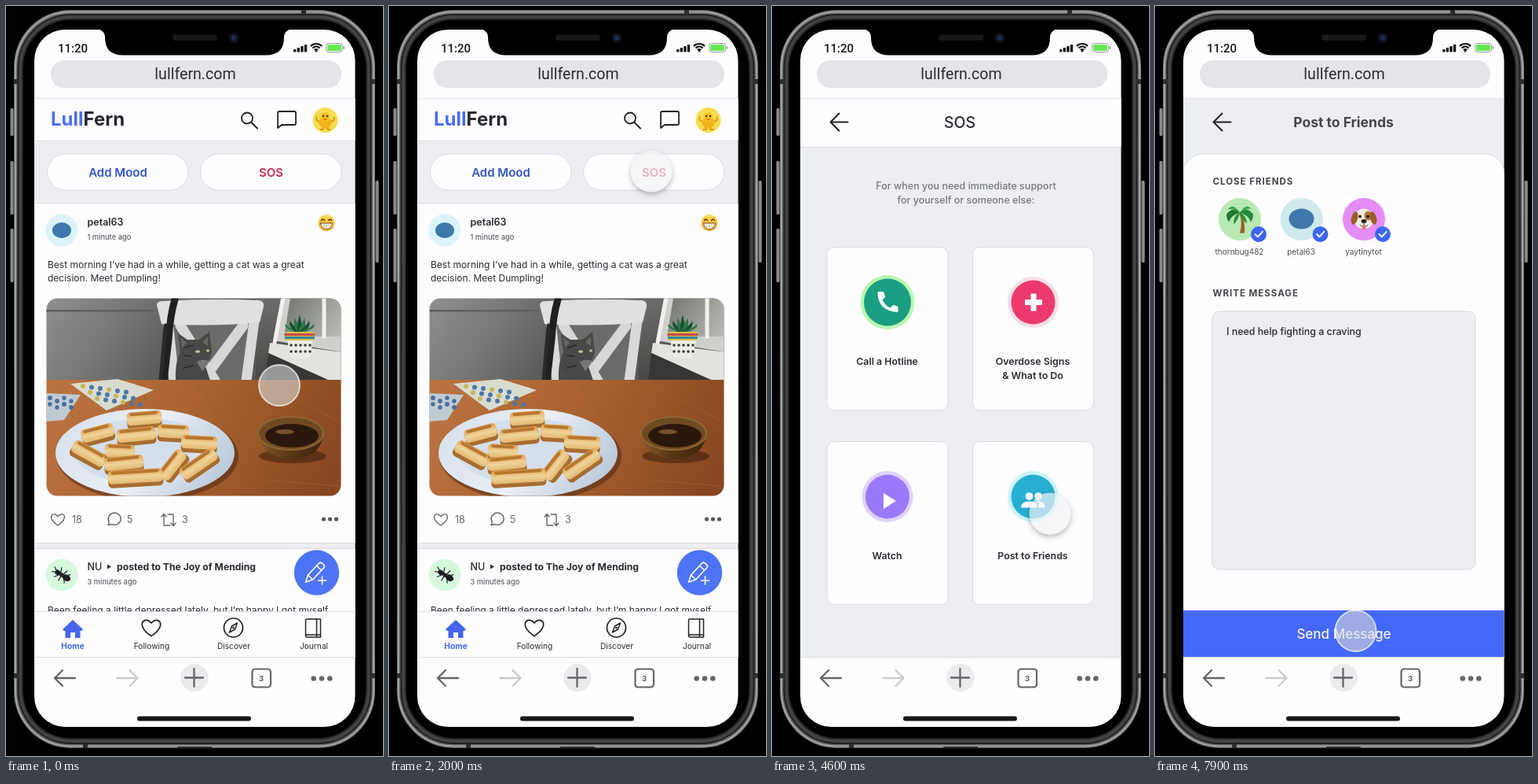
These frames come from a looping animation (480x953 px, 8 s). An HTML page with a canvas:

```html
<!DOCTYPE html>
<html lang="en">
<head>
<meta charset="utf-8">
<title>LullFern</title>
<style>
html, body { margin: 0; width: 100%; height: 100%; overflow: hidden; background: #000; }
canvas { display: block; width: 480px; height: 953px; }
</style>
</head>
<body>
<canvas id="stage"></canvas>
<script>
const W = 480, H = 953, LOOP = 8000, PAGE_W = 410;
const canvas = document.getElementById('stage');
const dpr = window.devicePixelRatio || 1;
canvas.width = W * dpr;
canvas.height = H * dpr;
const c = canvas.getContext('2d');

const INK = '#2b2b31', GREY = '#66666b', BLUE = '#4468f8', PALE = '#eceef2', WHITE = '#fefdff', RULE = '#dcdde2';
const TAU = Math.PI * 2;

// ---- helpers ----
const clamp = v => Math.max(0, Math.min(1, v));
const ramp = (t, a, b) => clamp((t - a) / (b - a));
const ease = p => p * p * (3 - 2 * p);

function paint(fill, stroke, lw = 1) {
  if (fill) { c.fillStyle = fill; c.fill(); }
  if (stroke) { c.strokeStyle = stroke; c.lineWidth = lw; c.stroke(); }
}
function box(x, y, w, h, r, fill, stroke, lw) {
  c.beginPath();
  c.roundRect(x, y, w, h, r);
  paint(fill, stroke, lw);
}
function oval(x, y, rx, ry, fill, stroke, lw, rot = 0) {
  c.beginPath();
  c.ellipse(x, y, rx, ry, rot, 0, TAU);
  paint(fill, stroke, lw);
}
const dot = (x, y, r, fill, stroke, lw) => oval(x, y, r, r, fill, stroke, lw);
function shape(d, x, y, fill, stroke, lw = 1.6, scale = 1) {
  c.save();
  c.translate(x, y);
  c.scale(scale, scale);
  const p = new Path2D(d);
  if (fill) { c.fillStyle = fill; c.fill(p); }
  if (stroke) {
    c.strokeStyle = stroke; c.lineWidth = lw;
    c.lineCap = c.lineJoin = 'round';
    c.stroke(p);
  }
  c.restore();
}
function text(s, x, y, size, weight, color, align = 'left', family = 'Inter') {
  c.font = `${weight} ${size}px ${family}, sans-serif`;
  c.fillStyle = color;
  c.textAlign = align;
  c.fillText(s, x, y);
}
function caps(s, x, y) {
  c.letterSpacing = '1px';
  text(s, x, y, 11.5, 700, '#46464b');
  c.letterSpacing = '0px';
}
function fade(alpha, draw) {
  if (alpha <= 0) return;
  c.save();
  c.globalAlpha = alpha;
  draw();
  c.restore();
}
function grad(x0, y0, x1, y1, ...stops) {
  const g = c.createLinearGradient(x0, y0, x1, y1);
  stops.forEach((s, i) => g.addColorStop(i / (stops.length - 1), s));
  return g;
}
const rule = (y, color = RULE) => box(36, y, 409, 1, 0, color);
function dots(x, y, gap, r, color) {
  for (let i = -1; i <= 1; i++) dot(x + i * gap, y, r, color);
}
const backArrow = () => shape('M11,0H-11M0,-11L-11,0L0,11', 85.5, 147.5, null, '#222', 2);

// ---- little pictures ----
function grin(x, y) {
  dot(x, y, 10.5, grad(x, y - 10, x, y + 10, '#ffdc55', '#f3a51f'));
  shape('M-6.5,-3Q-4.5,-6 -2.5,-3M2.5,-3Q4.5,-6 6.5,-3', x, y, null, '#5b3510', 1.4);
  shape('M-7.5,0.5H7.5Q6.5,8 0,8Q-6.5,8 -7.5,0.5Z', x, y, '#fff', '#7a4a1c', 1);
  shape('M-7,4.2H7M-3,1V7.5M0,1V8M3,1V7.5', x, y, null, '#b9a99a', 0.6);
}
function chick(x, y) {
  dot(x, y, 16, '#f8dc50');
  shape('M-7,2Q-13,1 -11,-4M7,2Q13,1 11,-4M-3,8V12H-6M3,8V12H6', x, y, null, '#df9411', 2);
  oval(x, y + 3, 8, 7.5, '#f1b31c');
  dot(x, y - 4, 6, '#f7c42c');
  dot(x - 2.5, y - 5, 1.3, '#4a3210');
  dot(x + 2.5, y - 5, 1.3, '#4a3210');
  shape('M-3,-2H3L0,1Z', x, y, '#e6721b');
}
function ant(x, y) {
  dot(x, y, 20.5, '#d6f8dd');
  c.save();
  c.translate(x, y);
  c.rotate(0.55);
  shape('M-2,0L-7,7M0,0L0,8M3,0L8,7M-2,0L-5,-8M1,0L3,-8M3,0L9,-6M-8,-1L-13,-4M-8,0L-13,3', 0, 0, null, '#222', 1.2);
  oval(7, 0, 5.5, 4, '#1d1d1f');
  oval(0, 0, 3.2, 2.6, '#2c2522');
  oval(-6, 0, 3.6, 3.2, '#1d1d1f');
  c.restore();
}
function palm(x, y) {
  shape('M-1,-8Q4,4 0,18H6Q7,4 2,-9Z', x, y, '#96622f');
  const leaf = 'M0,-8Q8,-17 17,-6Q17,0 14,4Q11,-5 0,-8Z';
  shape(leaf, x, y, '#23883a');
  c.save();
  c.translate(x, y);
  c.scale(-1, 1);
  shape(leaf, 0, 0, '#1c7a33');
  c.restore();
  shape('M0,-8Q-9,-21 -15,-12Q-7,-14 0,-8Q9,-21 14,-13Q6,-13 0,-8Z', x, y, '#37a548');
  shape('M0,-8Q-9,-4 -8,7Q-2,2 0,-8Q9,-4 9,6Q3,2 0,-8Z', x, y, '#2b9340');
}
function puppy(x, y) {
  oval(x, y, 12.5, 13, '#f4ece0');
  oval(x + 5.5, y - 4, 5, 6, '#b9763c');
  oval(x - 12, y - 1, 4, 8.5, '#9b5d2c', null, 0, 0.25);
  oval(x + 12, y - 1, 4, 8.5, '#9b5d2c', null, 0, -0.25);
  dot(x - 5, y - 3, 2, '#2a1b14');
  dot(x + 5, y - 3, 2, '#2a1b14');
  shape('M0,4V8M-5,8Q-2,11 0,8Q2,11 5,8', x, y, null, '#5b3a28', 1);
  oval(x, y + 3, 3.4, 2.4, '#241a18');
  oval(x, y + 11, 2.3, 3, '#ee6b7d');
}

// ---- post photograph, in flat tones ----
function photo() {
  c.save();
  c.beginPath();
  c.roundRect(51.5, 371.5, 375, 251, 14);
  c.clip();
  box(51, 371, 377, 105, 0, grad(52, 372, 200, 476, '#8f8f8d', '#777775', '#575755'));
  box(51, 386, 140, 2.5, 0, '#5f605e');
  box(318, 371, 34, 105, 0, grad(318, 372, 345, 474, '#6f6f6d', '#454644'));

  // window, sill
  shape('M350,371H428V440L340,425Z', 0, 0, '#cfd0cd');
  shape('M362,371H428V420H354Z', 0, 0, grad(355, 372, 425, 420, '#73766f', '#b9bcb6'));
  shape('M353,371L342,428M405,371V420', 0, 0, null, '#f0f0ee', 5);
  shape('M336,428L428,440V476H412L334,441Z', 0, 0, '#e2e2df');
  shape('M334,441L412,476H330Z', 0, 0, '#373735');

  // chair
  shape('M214,404H308V476H214Z', 0, 0, '#6b6c6a');
  shape('M222,406L266,476M302,406L250,476', 0, 0, null, '#d7d8d6', 13);
  shape('M206,400L214,476M316,400L306,476', 0, 0, null, '#d9dad8', 13);
  shape('M192,380Q192,375 200,375Q262,371 322,374Q329,375 328,382L323,402Q262,408 198,404Z', 0, 0, '#e0e1df');
  shape('M215,373Q209,393 207,424L201,476', 0, 0, null, '#211f20', 9);
  shape('M203,406L197,476', 0, 0, null, '#2a2829', 5);

  // cat
  shape('M216,476Q215,452 222,440L219,416L231,424H246L259,414L262,438Q262,449 253,455L260,476Z', 0, 0, '#474848');
  shape('M222,421L230,428L224,434ZM257,420L250,427L257,432Z', 0, 0, '#6c6562');
  shape('M243,452Q252,447 259,452L250,464Z', 0, 0, '#777775');
  oval(244, 439, 3, 1.8, '#b9bd91');
  oval(257, 438, 2, 1.8, '#b9bd91');
  shape('M228,434L238,431M227,444L236,445M226,460L238,457', 0, 0, null, '#292a2a', 1.5);

  // plant and pot
  for (let i = -3; i <= 3; i++) {
    const tip = i * 6, top = -23 + Math.abs(i) * 4;
    shape(`M-3,0Q${tip - 4},${top / 2} ${tip},${top}Q${tip + 3},${top / 2} 4,0Z`, 374, 415, i % 2 ? '#2d7748' : '#194f32');
  }
  shape('M358,424H391L387,446Q375,450 362,446Z', 0, 0, '#edece4');
  box(355, 414, 38, 11, 3, '#d6c14d');
  box(355, 416, 38, 3, 0, '#c94c45');
  box(355, 420, 38, 3, 0, '#37899a');
  for (let i = 0; i < 10; i++) dot(363 + (i % 5) * 6, 431 + Math.floor(i / 5) * 8, 1.8, '#3a3b3c');

  // table
  box(51, 475, 377, 149, 0, grad(80, 475, 410, 622, '#b9713f', '#a7602f', '#864620'));
  shape('M240,476L300,560M330,478L424,528M300,600L424,610', 0, 0, null, '#9d5a2d', 1);

  // napkins
  shape('M51,492L95,494L74,526L51,528Z', 0, 0, '#bfcbd3');
  shape('M82,480L142,474L188,488L128,514Z', 0, 0, '#d8dcd0');
  for (let i = 0; i < 18; i++) {
    const u = i % 6, v = Math.floor(i / 6);
    dot(98 + u * 11 + v * 9, 483 + u * 1.5 + v * 8, 3, i % 3 ? '#4f75a8' : '#c8b45d');
    if (i < 12) dot(56 + (i % 4) * 9, 498 + v * 8 + (i % 2) * 4, 2.7, '#496d9c');
  }

  // plate and food
  oval(180, 572, 116, 57, 'rgba(63,29,12,.45)');
  oval(177, 568, 114, 56, grad(90, 520, 260, 622, '#d9e3ee', '#e9eff5', '#bccbdc'));
  oval(177, 566, 90, 42, '#d3dfeb');
  const food = [[176, 525, 44, -.08], [117, 544, 42, -.25], [166, 546, 50, -.1], [105, 570, 46, .5],
    [145, 567, 38, .05], [150, 582, 50, -.1], [213, 542, 40, .05], [246, 556, 46, .05],
    [213, 584, 42, -.9], [246, 583, 52, -.6], [165, 599, 70, -.06]];
  for (const [x, y, w, a] of food) {
    c.save();
    c.translate(x, y);
    c.rotate(a);
    box(-w / 2, -8, w, 20, 5, '#a76c31');
    box(-w / 2, -10, w, 17, 5, grad(0, -10, 0, 8, '#d99c4b', '#f0d49a', '#e0b46c'));
    box(-w / 2 + 4, -9, w - 9, 4, 2, '#b87731');
    c.restore();
  }

  // bowl
  oval(365, 572, 43, 9, 'rgba(50,22,8,.5)');
  shape('M321,543Q323,565 344,572Q362,581 383,572Q402,565 404,543Z', 0, 0, grad(320, 545, 404, 575, '#8b602d', '#5b3817', '#39200e'));
  oval(362.5, 543, 41.5, 21, '#6f4a21', '#8e6736', 2);
  oval(364, 546, 34, 15, '#2c170d');
  oval(355, 541, 12, 3, '#76512f');
  c.restore();
}

// ---- pages ----
function pill(x, label, color) {
  box(x, 188, 179.5, 46, 23, WHITE, '#d9dbe1');
  text(label, x + 90, 217, 15, 600, color, 'center');
}
function home() {
  box(36, 118, 409, 709, 0, PALE);
  box(36, 118, 409, 53, 0, WHITE);
  rule(171);
  text('Lull', 57, 152, 24, 700, '#4b6cf3');
  const w = c.measureText('Lull').width;
  text('Fern', 57 + w, 152, 24, 700, '#27272e');
  dot(307, 142.5, 7, null, '#222', 1.8);
  shape('M312.5,148L320,155.5', 0, 0, null, '#222', 2);
  shape('M348,134H367Q369,134 369,136V149Q369,151 367,151H351L346,155V136Q346,134 348,134Z', 0, 0, null, '#222', 1.8);
  chick(406.5, 145);
  pill(52.5, 'Add Mood', '#3556c9');
  pill(247.5, 'SOS', '#c92f4b');

  box(36, 251, 409, 431, 0, WHITE);
  rule(250);
  rule(682);
  dot(71, 285, 20.5, '#dcf3fc');
  oval(71, 285, 12, 10, '#3f78ab');
  text('petal63', 103.5, 278.5, 12.5, 600, INK);
  text('1 minute ago', 103.5, 296.5, 9.3, 500, '#5f5f65');
  grin(408, 275.5);
  text('Best morning I’ve had in a while, getting a cat was a great', 53, 332.5, 12, 400, INK);
  text('decision. Meet Dumpling!', 53, 350, 12, 400, INK);
  photo();
  shape('M0,7.5C-15,-2 -7,-12 0,-4C7,-12 15,-2 0,7.5Z', 66, 652.5, null, GREY, 1.4);
  shape('M-8,7L-6.7,3A8,7.5 0 1 1 -3,6Z', 138, 652.5, null, GREY, 1.4);
  shape('M-9,-4L-6,-7.5L-3,-4M-6,-7V7H2M-1,-7H6V7M3,4L6,7.5L9,4', 207, 653, null, GREY, 1.4);
  text('18', 84, 657, 12.5, 400, GREY);
  text('5', 154, 657, 12.5, 400, GREY);
  text('3', 224, 657, 12.5, 400, GREY);
  dots(412.5, 652, 8, 2.6, '#58585d');

  box(36, 690, 409, 81, 0, WHITE);
  rule(689);
  ant(71, 723);
  text('NU', 103.5, 717, 12.5, 500, INK);
  shape('M129,709.5L134,712.5L129,715.5Z', 0, 0, INK);
  text('posted to The Joy of Mending', 141, 716.5, 12.2, 700, INK);
  text('3 minutes ago', 103.5, 735, 9.3, 500, '#5f5f65');
  text('Been feeling a little depressed lately, but I’m happy I got myself', 53, 772, 12, 400, INK);
  dot(395.5, 720, 28.7, '#4d74f5');
  shape('M-13,12L-10,3L4,-12Q6,-14 9,-11L10,-10Q12,-8 10,-6L-4,9ZM1,-9L7,-3M-10,3L-4,9M8,5V15M3,10H13', 394.5, 720, null, '#fff', 1.6);

  box(36, 770, 409, 57, 0, WHITE);
  rule(769);
  shape('M-13,1L0,-11L13,1L11,3H9.5V12H3V5H-3V12H-9.5V3H-11Z', 85, 791, '#4565ef');
  shape('M0,10.5C-21,-3 -9,-16 0,-6C9,-16 21,-3 0,10.5Z', 185, 790, null, '#222', 1.7);
  dot(289.5, 790, 12, null, '#222', 1.7);
  shape('M5,-6L2,2L-5,6L-2,-2Z', 289.5, 790, null, '#222', 1.5);
  dot(289.5, 790, 1.3, '#222');
  shape('M-9,-11H8Q9,-11 9,-10V8Q9,9 8,9H-8Q-10,9 -10,11Q-10,12 -8,12H4V-11M-10,11V-9Q-10,-11 -9,-11M4,12H9V-11', 391.5, 790, null, '#222', 1.5);
  text('Home', 85, 816.5, 10.3, 700, '#4565ef', 'center');
  ['Following', 'Discover', 'Journal'].forEach((s, i) =>
    text(s, [185.5, 290, 392][i], 816.5, 10.2, 400, INK, 'center'));
  box(444.5, 118, 1, 709, 0, RULE);
}

function card(x, y, color, ring, r, lines) {
  box(x + .5, y + .5, 154, 207, 9, WHITE, '#d9dce1');
  dot(x + 77.5, y + 70.5, r + 4.5, ring);
  dot(x + 77.5, y + 70.5, r, color);
  lines.forEach((s, i) => text(s, x + 77, y + 150 + i * 17.5, 12.4, 600, INK, 'center'));
}
function sos() {
  box(36, 118, 411, 709, 0, PALE);
  box(36, 118, 411, 61, 0, WHITE);
  rule(179);
  backArrow();
  text('SOS', 239, 154.5, 19.5, 500, INK, 'center');
  text('For when you need immediate support', 247, 233, 12.5, 500, '#77787e', 'center');
  text('for yourself or someone else:', 247, 250.5, 12.5, 500, '#77787e', 'center');
  card(69.5, 306, '#1a9e82', '#bbf6b0', 30, ['Call a Hotline']);
  card(255, 306, '#ed3a6d', '#f6dfe8', 28, ['Overdose Signs', '& What to Do']);
  card(69.5, 553, '#9b79fb', '#dfd3fb', 28, ['Watch']);
  card(255, 553, '#29aed3', '#cbf5fa', 28, ['Post to Friends']);
  shape('M-12,-13H-6Q-5,-13 -5,-12L-3.5,-7Q-3.5,-6 -4,-5.5L-7,-2.5Q-3,5 3,7.5L6,4.5Q6.5,4 7.5,4L12,5.5Q13,6 13,7V12Q13,13 12,13Q-13,11 -13,-12Q-13,-13 -12,-13Z', 147.5, 376, '#fff');
  shape('M-3.5,-11H3.5V-3.5H11V3.5H3.5V11H-3.5V3.5H-11V-3.5H-3.5Z', 333, 376.5, '#fff');
  shape('M-6,-10L10,0L-6,10Z', 148, 629, '#fff');
  dot(327.5, 623, 4.8, '#fff');
  dot(339, 623, 4.8, '#fff');
  shape('M-15,8V5Q-13,0 -5,0Q3,0 5,5V8ZM7,8V5Q7,2 4,0Q13,-1 15,5V8Z', 332.5, 629.5, '#fff');
}

function friend(x, color, name, draw) {
  dot(x, 271, 27, color);
  draw(x, 270.5);
  dot(x + 24, 290, 10, '#3d66f5');
  shape('M-4.5,0L-1.2,3.3L4.7,-3.2', x + 24, 290, null, '#fff', 2);
  text(name, x - .5, 316, 10, 400, '#4c4c52', 'center');
}
function compose(t) {
  const sent = ramp(t, 6400, 6600);
  box(36, 118, 411, 709, 0, PALE);
  backArrow();
  text('Post to Friends', 240, 154, 17.5, 700, '#45454a', 'center');
  box(36, 188, 409, 640, [25, 25, 0, 0], WHITE, '#d5d9dd');
  caps('CLOSE FRIENDS', 73.5, 227);
  friend(108, '#b8e9b3', 'thornbug482', palm);
  friend(186.5, '#cfe9ec', 'petal63', (x, y) => oval(x, y, 16, 13, '#3f78ab'));
  friend(266, '#e48cf5', 'yaytinytot', puppy);
  caps('WRITE MESSAGE', 73.5, 368.5);
  box(73, 388, 335, 328, 9, PALE, '#d5d8dd');
  fade(1 - sent, () => {
    text('Write here...', 91, 417, 12.5, 400, '#a9abb1');
    box(92, 673.5, 205, 28, 14, WHITE, '#d9dce3');
    text('I need help fighting a craving', 194, 692, 12.4, 500, '#3a55b4', 'center');
  });
  fade(sent, () => text('I need help fighting a craving', 91, 417.5, 12.4, 500, INK));
  box(36, 768, 411, 59, 0, '#7d7b82');
  fade(sent, () => box(36, 768, 411, 59, 0, BLUE));
  text('Send Message', 240.5, 804, 17, 500, '#f7f7fb', 'center');
}

// ---- phone ----
function body() {
  c.fillStyle = '#000';
  c.fillRect(0, 0, W, H);
  for (const [x, y, h] of [[5, 130, 35], [5, 197, 68], [5, 283, 68], [470, 222, 104]])
    box(x, y, 5, h, 2, grad(x, 0, x + 5, 0, '#3a3a3b', '#a19e9c', '#4a4a4a'));
  box(10, 5, 460, 938, 72, grad(0, 5, 0, 943, '#6d6b6b', '#555454', '#666464'));
  box(12, 7.5, 456, 933, 70, null, '#a5a2a0', 2.2);
  box(14.5, 10, 451, 928, 68, '#1f1f20');
  box(18.5, 14, 443, 920, 64, null, '#434344', 4);
  box(21, 17, 438, 914, 62, '#000', '#28282a', 1.5);
  for (const y of [93, 848]) {
    box(10, y, 6, 6, 0, '#2c2c2d');
    box(464, y, 6, 6, 0, '#2c2c2d');
  }
  box(376, 5, 6, 6, 0, '#2c2c2d');
  box(98, 937, 6, 6, 0, '#2c2c2d');
  box(218, 941, 44, 2.5, 1, '#29292a');
}
function statusBar() {
  box(36, 30, 409, 88, 0, WHITE);
  rule(117, '#e4e4e8');
  text('11:20', 66, 58.5, 15, 500, '#161618', 'left', 'Roboto');
  for (let i = 0; i < 4; i++) box(366 + i * 4.6, 55 - i * 2, 3.4, 3.5 + i * 2, .8, '#161618');
  for (const r of [3, 6.5, 10]) {
    c.beginPath();
    c.arc(395, 58, r, -Math.PI * .75, -Math.PI * .25);
    paint(null, '#161618', 2.2);
  }
  dot(395, 57, 1.5, '#161618');
  box(407.5, 47.5, 21, 11, 3, null, '#9a9a9d');
  box(409, 49, 18, 8, 1.5, '#66e854');
  box(429.5, 51, 1.5, 4, 1, '#9a9a9d');
  box(57, 69, 370, 35, 17, '#e4e5e9');
  text('lullfern.com', 241, 92.5, 19.6, 400, '#2d2d31', 'center', 'Roboto');
}
function browserBar() {
  box(36, 827, 409, 90, 0, WHITE);
  rule(827);
  shape('M13,0H-13M-3,-10L-13,0L-3,10', 75, 854, null, '#66666a', 2.3);
  shape('M-13,0H13M3,-10L13,0L3,10', 154.5, 854, null, '#cbcbcf', 2.3);
  dot(240, 853.5, 17.7, '#ebebee');
  shape('M-11.5,0H11.5M0,-11.5V11.5', 239.5, 853.5, null, '#66666a', 2.3);
  box(313.5, 842.5, 23.5, 23, 3.5, null, '#66666a', 2.2);
  text('3', 325, 857.5, 9.5, 700, '#5c5c60', 'center');
  dots(402, 854.5, 10.3, 3.3, '#66666a');
  box(167, 902.5, 145, 6, 3, '#18181b');
}
function notch() {
  shape('M116,29Q126,31 126,40Q126,62.5 149,62.5H331Q354,62.5 354,40Q354,31 364,29Z', 0, 0, '#000');
  box(212, 36.5, 57, 7.5, 3.7, '#18181a');
  dot(290, 40.5, 6.5, '#10121c');
  dot(290, 40.5, 3, '#1c2c5e');
}

// ---- touch marker ----
const moves = [
  [1200, 1800, 348, 482, 334, 210],
  [3500, 4250, 334, 210, 354, 645],
  [5300, 5950, 354, 645, 217.5, 685],
  [6750, 7500, 217.5, 685, 255.5, 794]
];
const presses = [[1780, 2900], [4350, 5050], [6000, 6450]];

function touch(t) {
  let [, , x, y] = moves[0];
  for (const [a, b, x0, y0, x1, y1] of moves) {
    if (t < a) break;
    const p = ease(ramp(t, a, b));
    x = x0 + (x1 - x0) * p;
    y = y0 + (y1 - y0) * p;
  }
  let down = 0;
  for (const [a, b] of presses) down = Math.max(down, ramp(t, a, a + 150) - ramp(t, b, b + 200));
  fade(down, () => {
    c.save();
    c.beginPath();
    c.rect(0, 0, W, H);
    c.arc(x, y, 26.5, 0, TAU);
    c.clip('evenodd');
    c.shadowColor = 'rgba(0,0,0,.3)';
    c.shadowBlur = 7 * dpr;
    c.shadowOffsetY = 3 * dpr;
    dot(x, y, 26, '#fff');
    c.restore();
    dot(x, y, 26.5, 'rgba(244,244,245,.68)');
  });
  fade(1 - down, () => dot(x, y, 26, 'rgba(215,217,217,.6)', 'rgba(250,250,250,.75)', 1.8));
}

function shifted(dx, draw) {
  if (Math.abs(dx) >= PAGE_W) return;
  c.save();
  c.translate(dx, 0);
  draw();
  c.restore();
}

function render(t) {
  c.setTransform(dpr, 0, 0, dpr, 0, 0);
  body();
  c.save();
  c.beginPath();
  c.roundRect(36, 30, 408.5, 886, 39);
  c.clip();
  const page = ease(ramp(t, 2150, 2650)) + ease(ramp(t, 4800, 5300));
  shifted(-page * PAGE_W, home);
  shifted((1 - page) * PAGE_W, sos);
  shifted((2 - page) * PAGE_W, () => compose(t));
  statusBar();
  browserBar();
  touch(t);
  notch();
  c.restore();
}

const start = performance.now();
function tick() {
  render((performance.now() - start) % LOOP);
  requestAnimationFrame(tick);
}
tick();
</script>
</body>
</html>
```
